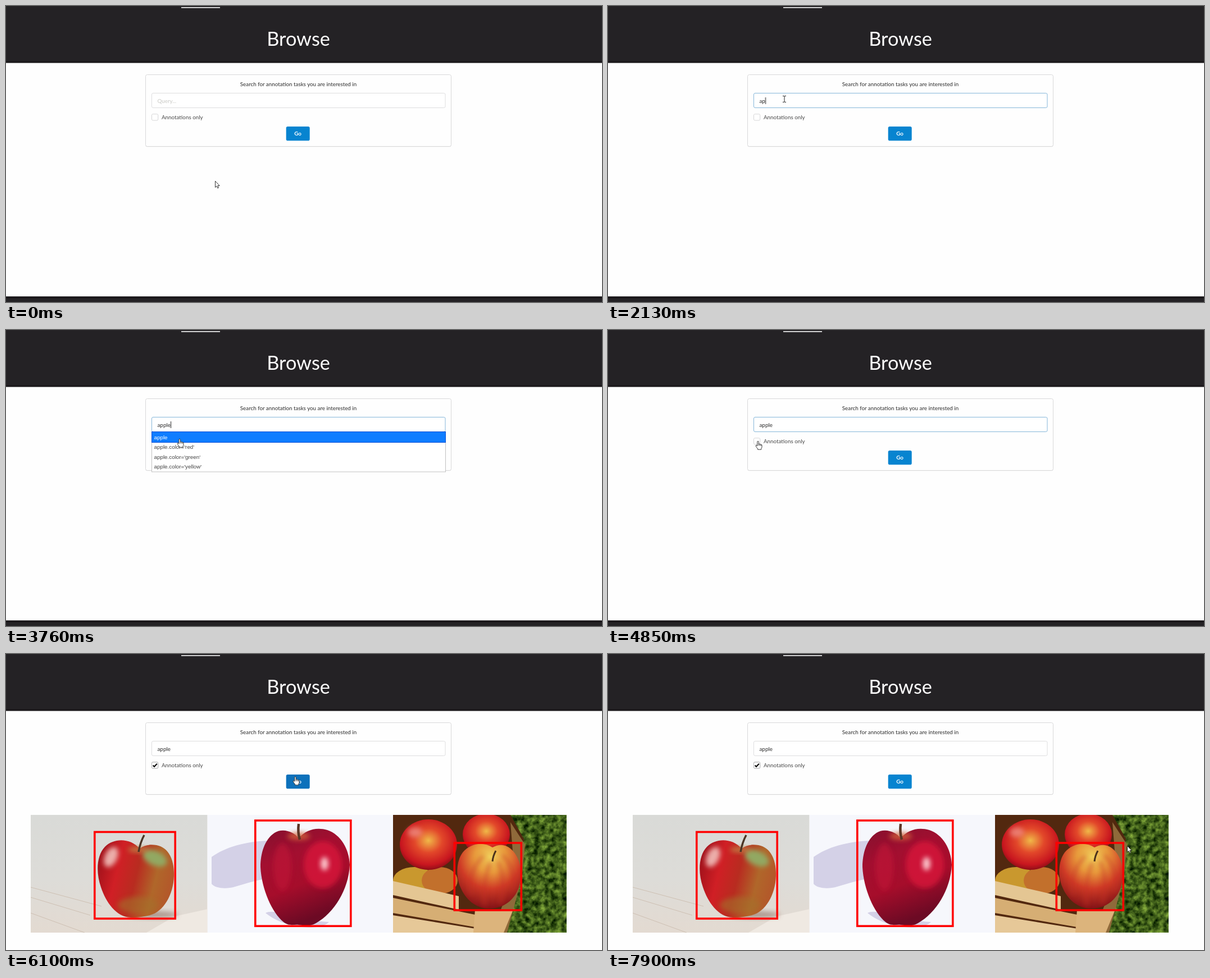
An HTML page for the animation above (8000 ms loop, 1061 px wide and 528 px high).

```html
<!DOCTYPE html>
<html lang="en">
<head>
<meta charset="utf-8">
<title>Browse</title>
<style>
html, body { margin: 0; width: 100%; height: 100%; overflow: hidden; background: #fefefe; }
svg { display: block; width: 100%; height: 100%; }
text { font: 9.8px Lato, sans-serif; fill: #2b2b2b; }
.mid { text-anchor: middle; }
.list text { font-family: "Liberation Sans", Arial, sans-serif; fill: #444; }
.list .picked { fill: #fff; }
.frame { fill: none; stroke: #f00; stroke-width: 3.6; }
.soft { filter: url(#soft); }

.k { animation: 8s step-end infinite; }
#ptr { animation-name: move; }
#arrow { animation-name: arrow; }
#beam { animation-name: beam; }
#hand { animation-name: hand; }
#field { animation-name: focus; }
#hint { animation-name: hint; }
#t1 { animation-name: t1; }
#t2 { animation-name: t2; }
#t3 { animation-name: t3; }
#t4 { animation-name: t4; }
#caret { animation-name: caret, blink; }
#list { animation-name: list; }
#pick { animation-name: pick; }
#tick { animation-name: tick; }
#go { animation-name: hover; }
#footer { animation-name: footer; }
#results { animation-name: results; }

@keyframes move {
  0% { transform: translate(372px, 312px); }
  4.75% { transform: translate(348px, 236px); }
  6.75% { transform: translate(322px, 157px); }
  10.125% { transform: translate(318px, 162px); }
  11.75% { transform: translate(315px, 165px); }
  13.375% { transform: translate(314px, 166px); }
  40.625% { transform: translate(312px, 186px); }
  42.25% { transform: translate(310px, 197px); }
  47% { transform: translate(309px, 194px); }
  55.75% { transform: translate(300px, 196px); }
  57.4375% { transform: translate(283px, 197px); }
  59.0625% { transform: translate(271px, 198px); }
  60.625% { transform: translate(267px, 198px); }
  66.125% { transform: translate(300px, 205px); }
  67.8125% { transform: translate(395px, 214px); }
  69.5% { transform: translate(478px, 219px); }
  71.25% { transform: translate(515px, 218.5px); }
  83.125% { transform: translate(542px, 212px); }
  85.0625% { transform: translate(588px, 203px); }
  87% { transform: translate(655px, 201px); }
  88.9375% { transform: translate(730px, 214px); }
  90.875% { transform: translate(805px, 240px); }
  92.8125% { transform: translate(862px, 274px); }
  94.75% { transform: translate(898px, 302px); }
  96.75% { transform: translate(915px, 329px); }
  98.75%, 100% { transform: translate(924px, 342px); }
}
@keyframes arrow {
  0%, 67.8125%, 83.125%, 100% { visibility: visible; }
  6.75%, 71.25% { visibility: hidden; }
}
@keyframes beam {
  0%, 40.625%, 100% { visibility: hidden; }
  6.75% { visibility: visible; }
}
@keyframes hand {
  0%, 67.8125%, 83.125%, 100% { visibility: hidden; }
  40.625%, 71.25% { visibility: visible; }
}
@keyframes focus {
  0%, 62.5%, 100% { stroke: #dededf; }
  11.75% { stroke: #b3cedf; }
  13.375% { stroke: #85b7d9; }
}
@keyframes hint {
  0% { visibility: visible; fill: #c8c8c4; }
  13.375% { visibility: visible; fill: #a0a0a0; }
  26.625%, 100% { visibility: hidden; }
}
@keyframes t1 { 0% { visibility: hidden; } 26.625%, 100% { visibility: visible; } }
@keyframes t2 { 0% { visibility: hidden; } 30.25%, 100% { visibility: visible; } }
@keyframes t3 { 0% { visibility: hidden; } 33.625%, 100% { visibility: visible; } }
@keyframes t4 { 0% { visibility: hidden; } 35.5%, 100% { visibility: visible; } }
@keyframes caret {
  0% { transform: translateX(269.5px); }
  26.625% { transform: translateX(280.5px); }
  30.25% { transform: translateX(286.5px); }
  33.625% { transform: translateX(288.5px); }
  35.5%, 100% { transform: translateX(293.5px); }
}
@keyframes blink {
  0%, 19.75%, 40.625%, 50.5%, 59.0625%, 100% { visibility: hidden; }
  13.375%, 26.625%, 47%, 55.75% { visibility: visible; }
}
@keyframes list { 0%, 50.5%, 100% { visibility: hidden; } 39% { visibility: visible; } }
@keyframes pick { 0%, 50.5%, 100% { visibility: hidden; } 40.625% { visibility: visible; } }
@keyframes tick { 0% { visibility: hidden; } 62.5%, 100% { visibility: visible; } }
@keyframes hover { 0%, 83.125%, 100% { fill: #0784d0; } 74.625% { fill: #0d71bb; } }
@keyframes footer { 0% { visibility: visible; } 74.625%, 100% { visibility: hidden; } }
@keyframes results { 0% { visibility: hidden; } 76.25%, 100% { visibility: visible; } }
</style>
</head>
<body>
<svg viewBox="0 0 1061 528">
  <defs>
    <linearGradient id="table" x1="0" y1="0" x2="0" y2="1">
      <stop offset="0" stop-color="#d9dad7"/><stop offset=".55" stop-color="#dddcd8"/>
      <stop offset="1" stop-color="#e3dad1"/>
    </linearGradient>
    <linearGradient id="skin1" x1="0" y1=".35" x2="1" y2=".6">
      <stop offset="0" stop-color="#a3121b"/><stop offset=".25" stop-color="#d01f25"/>
      <stop offset=".5" stop-color="#b82c20"/><stop offset=".75" stop-color="#b0672a"/>
      <stop offset="1" stop-color="#b4552a"/>
    </linearGradient>
    <linearGradient id="skin2" x1="0" y1="0" x2=".35" y2="1">
      <stop offset="0" stop-color="#84102e"/><stop offset=".35" stop-color="#a30f30"/>
      <stop offset=".65" stop-color="#a60d2b"/><stop offset="1" stop-color="#6c0a24"/>
    </linearGradient>
    <radialGradient id="skin3" cx=".52" cy=".2" r=".82">
      <stop offset="0" stop-color="#f0cf5c"/><stop offset=".3" stop-color="#e89a3c"/>
      <stop offset=".6" stop-color="#cf3a26"/><stop offset="1" stop-color="#7e1016"/>
    </radialGradient>
    <radialGradient id="skin4" cx=".5" cy=".42" r=".6">
      <stop offset="0" stop-color="#f0b848"/><stop offset=".4" stop-color="#e2482a"/>
      <stop offset=".8" stop-color="#c8161f"/><stop offset="1" stop-color="#860c16"/>
    </radialGradient>
    <filter id="soft" x="-50%" y="-50%" width="200%" height="200%"><feGaussianBlur stdDeviation="4"/></filter>
    <filter id="grass" x="0" y="0" width="1" height="1" color-interpolation-filters="sRGB">
      <feTurbulence type="fractalNoise" baseFrequency=".1" numOctaves="3" seed="4"/>
      <feColorMatrix values=".8 0 0 0 -.15  .9 0 0 0 -.08  .4 0 0 0 -.1  0 0 0 0 1"/>
    </filter>
    <clipPath id="c1"><rect x="44" y="287" width="314.5" height="210"/></clipPath>
    <clipPath id="c2"><rect x="358.5" y="287" width="330.5" height="210"/></clipPath>
    <clipPath id="c3"><rect x="689" y="287" width="309" height="210"/></clipPath>
  </defs>

  <rect width="1061" height="101.6" fill="#1c191c"/>
  <rect width="1061" height="98" fill="#242225"/>
  <rect x="312" y="2" width="69" height="1.6" fill="#fff"/>
  <text class="mid" x="520.6" y="71" style="font-size:34.3px;fill:#fff">Browse</text>
  <g id="footer" class="k">
    <rect y="518" width="1061" height="10" fill="#1c191c"/>
    <rect y="522" width="1061" height="6" fill="#242225"/>
  </g>

  <rect x="248.5" y="123.2" width="544" height="128" rx="3" fill="#e0e0e0"/>
  <rect x="248.5" y="122.5" width="544" height="128" rx="3" fill="#fefefe" stroke="#d9d9da"/>
  <text class="mid" x="520.5" y="143">Search for annotation tasks you are interested in</text>
  <rect id="field" class="k" x="259.5" y="155.5" width="522.5" height="26" rx="2.5" fill="#fff"/>
  <text id="hint" class="k" x="269.5" y="173">Query...</text>
  <text x="269.5" y="173"><tspan id="t1" class="k">ap</tspan><tspan id="t2" class="k">p</tspan><tspan id="t3" class="k">l</tspan><tspan id="t4" class="k">e</tspan></text>
  <path id="caret" class="k" d="M0 163V175" stroke="#111"/>

  <rect x="259.5" y="192.8" width="11.2" height="11.2" rx="2" fill="#fff" stroke="#d6d6d7"/>
  <g id="tick" class="k" fill="none">
    <rect x="259.5" y="192.8" width="11.2" height="11.2" rx="2" stroke="#b4b4b5"/>
    <path d="M261.6 198.6L264 201L268.8 195.8" stroke="#111" stroke-width="2.2"/>
  </g>
  <text x="277" y="202.3" style="fill:#484848">Annotations only</text>
  <rect id="go" class="k" x="498.7" y="215" width="42" height="25.2" rx="2.8"/>
  <text class="mid" x="519.6" y="231" style="font-weight:700;fill:#fff">Go</text>

  <g id="list" class="k list">
    <rect x="259.5" y="181.5" width="523" height="71.5" fill="#fff" stroke="#c0c0c0"/>
    <text x="263.6" y="194.8">apple</text>
    <text x="263.6" y="212.3">apple.color='red'</text>
    <text x="263.6" y="229.8">apple.color='green'</text>
    <text x="263.6" y="247.3">apple.color='yellow'</text>
  </g>
  <g id="pick" class="k list">
    <rect x="259.5" y="181.5" width="523" height="19" fill="#0f7dff" stroke="#0a4fd6"/>
    <text class="picked" x="263.6" y="194.8">apple</text>
  </g>

  <g id="results" class="k">
    <g clip-path="url(#c1)">
      <rect x="44" y="287" width="315" height="210" fill="url(#table)"/>
      <path d="M250 497L300 468L359 455V497Z" fill="#efe9e2"/>
      <path d="M44 416L170 450M44 434L150 466M44 462L140 497" stroke="#cdbfb2" fill="none"/>
      <ellipse cx="262" cy="465" rx="44" ry="6" fill="#94786c" opacity=".7" class="soft"/>
      <path d="M238 347C221 328 192 328 176 344C161 360 160 390 169 416C178 443 196 469 222 470C234 471 246 468 256 466C280 460 298 430 299 396C300 368 290 345 268 341C256 339 246 341 238 347Z" fill="url(#skin1)"/>
      <ellipse cx="265" cy="364" rx="23" ry="13" transform="rotate(25 265 364)" fill="#92a862" class="soft"/>
      <ellipse cx="236" cy="349" rx="19" ry="5" fill="#c08a48" opacity=".8" class="soft"/>
      <ellipse cx="235" cy="448" rx="36" ry="15" fill="#a4702c" opacity=".6" class="soft"/>
      <ellipse cx="187" cy="362" rx="11" ry="19" transform="rotate(25 187 362)" fill="#f4c8c2" opacity=".85" class="soft"/>
      <path d="M236 353Q239 336 246 323" stroke="#4c3626" stroke-width="3.5" fill="none"/>
    </g>
    <rect class="frame" x="157.8" y="317.5" width="143.4" height="154.5"/>

    <g clip-path="url(#c2)">
      <rect x="358.5" y="287" width="331" height="210" fill="#f6f7fc"/>
      <path d="M366 362C390 345 425 334 470 333L480 398C450 402 428 409 408 415C392 420 372 418 366 410Z" fill="#d4d1e7"/>
      <path d="M462 462C478 452 530 478 575 478C560 494 500 492 462 462Z" fill="#d4d1e7"/>
      <path d="M521 328C508 314 490 311 478 319C460 331 453 356 453 380C455 420 474 462 494 478C504 486 512 482 521 483C530 484 540 487 552 480C584 462 610 420 612 376C611 348 596 322 572 314C552 308 534 314 521 328Z" fill="url(#skin2)"/>
      <ellipse cx="564" cy="376" rx="34" ry="42" fill="#d8143a" opacity=".8" class="soft"/>
      <ellipse cx="492" cy="380" rx="16" ry="42" fill="#c21638" opacity=".6" class="soft"/>
      <ellipse cx="521" cy="325" rx="20" ry="7" fill="#d2643a" opacity=".8" class="soft"/>
      <ellipse cx="567" cy="374" rx="7" ry="12" fill="#fbc4ca" class="soft"/>
      <path d="M523 331Q519 318 521 303" stroke="#5c3524" stroke-width="4.5" fill="none"/>
    </g>
    <rect class="frame" x="443.8" y="297" width="170" height="188.3"/>

    <g clip-path="url(#c3)">
      <rect x="689" y="287" width="309" height="210" filter="url(#grass)"/>
      <path d="M689 287H898L922 330L890 497H689Z" fill="#52280f"/>
      <path d="M898 300L924 340L918 400L892 497H866L905 390Z" fill="#8f6a3a"/>
      <ellipse cx="727" cy="404" rx="38" ry="24" fill="#c9982e"/>
      <ellipse cx="772" cy="404" rx="32" ry="24" fill="#c2702c"/>
      <ellipse cx="855" cy="322" rx="42" ry="37" fill="url(#skin4)"/>
      <ellipse cx="752" cy="340" rx="51" ry="45" fill="url(#skin4)"/>
      <ellipse cx="728" cy="318" rx="13" ry="9" fill="#f0958c" opacity=".7" class="soft"/>
      <path d="M689 405L806 432V456L689 430Z" fill="#e4c693"/>
      <path d="M689 435L840 466V488L689 462Z" fill="#d6ae74"/>
      <path d="M689 466L842 491V497H689Z" fill="#e6c898"/>
      <path d="M835 456L902 458L886 497H832Z" fill="#dcb47c"/>
      <path d="M866 345C849 334 826 338 813 354C801 370 801 398 809 416C818 438 836 453 858 454C884 455 905 440 913 416C920 394 917 368 903 352C892 339 879 338 866 345Z" fill="url(#skin3)"/>
      <g stroke="#c63222" stroke-width="5" opacity=".6" fill="none" class="soft">
        <path d="M850 360Q820 390 828 430M862 372Q848 410 852 450M876 370Q890 400 880 446M884 358Q912 390 902 424"/>
      </g>
      <path d="M866 370Q867 360 872 351" stroke="#4b321c" stroke-width="3" fill="none"/>
    </g>
    <rect class="frame" x="798.3" y="337" width="119" height="120"/>
  </g>

  <g id="ptr" class="k" stroke-linejoin="round">
    <path id="arrow" class="k" d="M.5 .3V11.6L3 9.2L4.8 13L6.6 12.2L4.9 8.5H8.2Z" fill="#fff" stroke="#222" stroke-width=".9"/>
    <path id="beam" class="k" d="M-3 -5.5H-1L0 -4.7L1 -5.5H3M0 -4.7V4.7M-3 5.5H-1L0 4.7L1 5.5H3" fill="none" stroke="#222"/>
    <g id="hand" class="k" stroke="#222" stroke-width=".9">
      <path d="M-1.2 9V1.4Q-1.2 .4 0 .4T1.2 1.4V5.4Q2.8 4.6 3.4 5.8Q4.9 5.1 5.4 6.4Q7 6 7 7.6V10.2Q7 12.4 5.8 13.6V15.2H-.4V14Q-2.2 12 -3.8 9.2Q-4.4 7.8 -3.2 7.6Q-2.2 7.4 -1.2 9Z" fill="#fff"/>
      <path d="M1.2 5.4V8.4M3.4 5.8V8.4M5.4 6.4V8.6" fill="none"/>
    </g>
  </g>
</svg>
</body>
</html>
```
